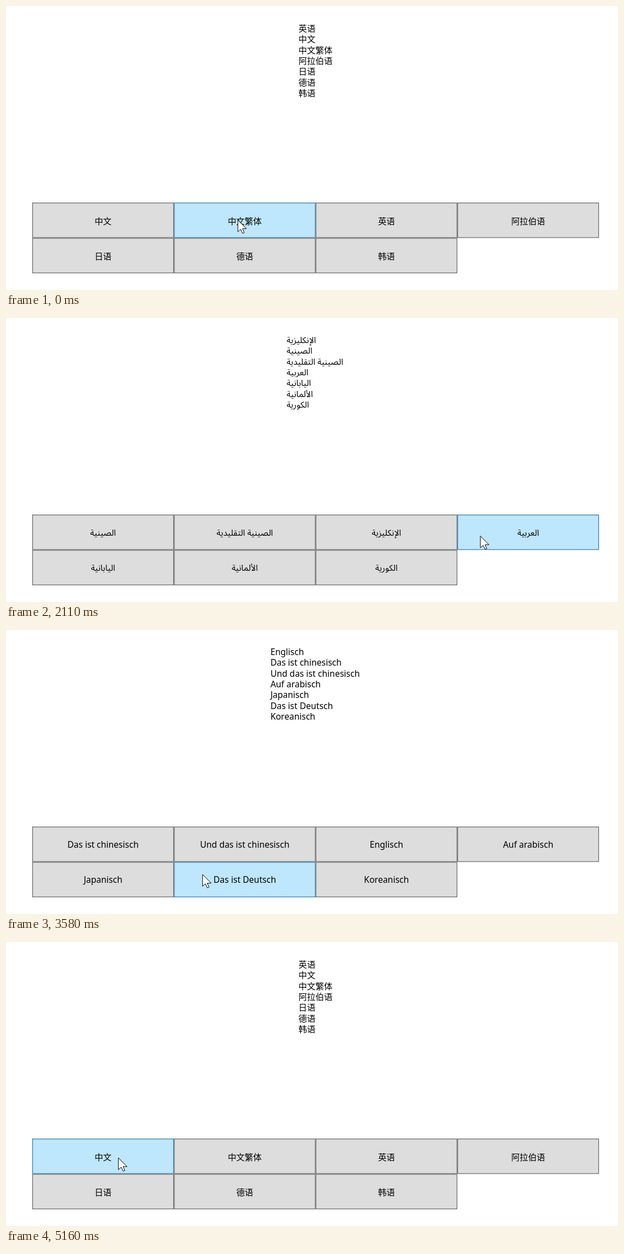
An HTML page for the animation above (5.78 s loop, 1098x510 px).

```html
<!DOCTYPE html>
<html lang="zh-CN">
<head>
<meta charset="utf-8">
<title>Language switch</title>
<style>
html, body { margin: 0; width: 100%; height: 100%; overflow: hidden; background: #fff; }
svg { display: block; width: 1098px; height: 510px; }
text { fill: #000; font-size: 15.25px; white-space: pre; }
.cjk text { font-family: 'Noto Sans CJK SC', 'Noto Sans CJK', sans-serif; }
.jp text { font-family: 'Noto Sans CJK JP', 'Noto Sans CJK', sans-serif; }
.kr text { font-family: 'Noto Sans CJK KR', 'Noto Sans CJK', sans-serif; font-size: 15.5px; letter-spacing: .85px; }
.latin text { font-family: 'Noto Sans', 'Open Sans', sans-serif; font-size: 15.5px; }
.arab text { font-family: 'Noto Sans', 'Noto Sans Arabic', 'DejaVu Sans', sans-serif; }
.label { text-anchor: middle; }
rect { fill: #ddd; stroke: #707070; stroke-width: 1.3; }
rect.hover { fill: #bee6fd; stroke: #3c7fb1; }
</style>
</head>
<body>
<svg id="stage" viewBox="0 0 1098 510">
  <g id="cells"></g>
  <g id="words"></g>
  <path id="arrow" d="M0 0V21.2L4.9 16.6L8.6 24L11.6 22.6L8.3 15.6H15.4Z"
        fill="#fff" stroke="#000" stroke-width="1"/>
</svg>
<script>
const LOOP = 5780, STEP = 69.5;
const CELL_W = 254.25, CELL_H = 63.5, LEFT = 47, TOP = 353;
const ORDER = [1, 2, 0, 3, 4, 5, 6];   // list entry shown on each button

const simplified = { cls: 'cjk', x: 524.8, y: 45.9,
  words: ['英语', '中文', '中文繁体', '阿拉伯语', '日语', '德语', '韩语'] };

// each language, from the moment it is switched on
const scenes = [
  { at: 0, ...simplified },
  { at: 570, cls: 'cjk', x: 524.8, y: 45.9,
    words: ['英語', '中文簡體', '中文繁體', '阿拉伯語', '日語', '德语', '韓語'] },
  { at: 1330, cls: 'latin', x: 511.6, y: 45,
    words: ['English', 'Chinese', 'Chinese TW', 'Arab', 'Japanese', 'German', 'Korean'] },
  { at: 2040, cls: 'arab', x: 503.6, y: 45,
    words: ['الإنكليزية', 'الصينية', 'الصينية التقليدية', 'العربية', 'اليابانية', 'الألمانية', 'الكورية'] },
  { at: 2740, cls: 'jp', x: 502, y: 45.5,
    words: ['英語', '中国語', '中国語繁体字', 'アラビア語では', '日本語', 'ドイツ語', '韓国語'] },
  { at: 3520, cls: 'latin', x: 474.4, y: 45,
    words: ['Englisch', 'Das ist chinesisch', 'Und das ist chinesisch', 'Auf arabisch',
            'Japanisch', 'Das ist Deutsch', 'Koreanisch'] },
  { at: 4190, cls: 'kr', x: 515.2, y: 44.7,
    words: ['영어', '중국어', '중국어 번체', '아랍어로', '일본어', '독일어', '한국어'] },
  { at: 5020, ...simplified }
];

const linear = p => p;
const speedUp = p => p ** 1.2;
const slowDown = p => 1 - (1 - p) ** 2;

// pointer stops: time, x, y, easing towards the next stop
const path = [
  [0, 416, 384.3, linear], [570, 416, 384.3, speedUp], [850, 528.3, 387, slowDown],
  [1120, 690, 387, linear], [1330, 690, 387, speedUp], [1540, 802.6, 385.2, slowDown],
  [1900, 925, 385, linear], [2040, 925, 385, speedUp], [2440, 321.3, 438.2, slowDown],
  [2660, 200, 440, linear], [3050, 200, 440, slowDown], [3260, 352.7, 439, linear],
  [3580, 352.7, 439, speedUp], [4050, 650, 438, linear], [4330, 650, 438, speedUp],
  [4470, 469.7, 432, slowDown], [4790, 201.7, 387.7, linear], [LOOP, 201.7, 387.7, linear]
];

function make(tag, parent, attrs, text) {
  const el = document.createElementNS('http://www.w3.org/2000/svg', tag);
  for (const key in attrs) el.setAttribute(key, attrs[key]);
  if (text) el.textContent = text;
  return parent.appendChild(el);
}

const byId = id => document.getElementById(id);
const corner = i => [LEFT + i % 4 * CELL_W, TOP + Math.floor(i / 4) * CELL_H];

const cells = ORDER.map((_, i) => {
  const [x, y] = corner(i);
  return make('rect', byId('cells'),
    { x: x + .65, y: y + .65, width: CELL_W - 1.3, height: CELL_H - 1.3 });
});

const groups = scenes.map(({ cls, x, y, words }) => {
  const g = make('g', byId('words'), { class: cls });
  words.forEach((word, i) => make('text', g, { x, y: y + i * 19.36 }, word));
  ORDER.forEach((n, i) => {
    const [left, top] = corner(i);
    make('text', g, { class: 'label', x: left + CELL_W / 2, y: y + top - 7.1 }, words[n]);
  });
  return g;
});

function pointer(t) {
  const i = path.findLastIndex(stop => stop[0] <= t);
  const [t0, x0, y0, ease] = path[i];
  const [t1, x1, y1] = path[i + 1];
  const p = ease(Math.floor((t - t0) / STEP) * STEP / (t1 - t0));
  return [x0 + (x1 - x0) * p, y0 + (y1 - y0) * p];
}

function draw(t) {
  const now = scenes.findLastIndex(s => s.at <= t);
  groups.forEach((g, i) => g.style.display = i === now ? '' : 'none');

  // highlight trails the pointer by one step
  const [hx, hy] = pointer(Math.max(0, t - 70));
  const over = Math.floor((hx - LEFT) / CELL_W) + 4 * Math.floor((hy - TOP) / CELL_H);
  cells.forEach((cell, i) => cell.classList.toggle('hover', i === over));

  byId('arrow').setAttribute('transform', `translate(${pointer(t)})`);
}

let start;
function frame(now) {
  start ??= now;
  draw((now - start) % LOOP);
  requestAnimationFrame(frame);
}
draw(0);
requestAnimationFrame(frame);
</script>
</body>
</html>
```
